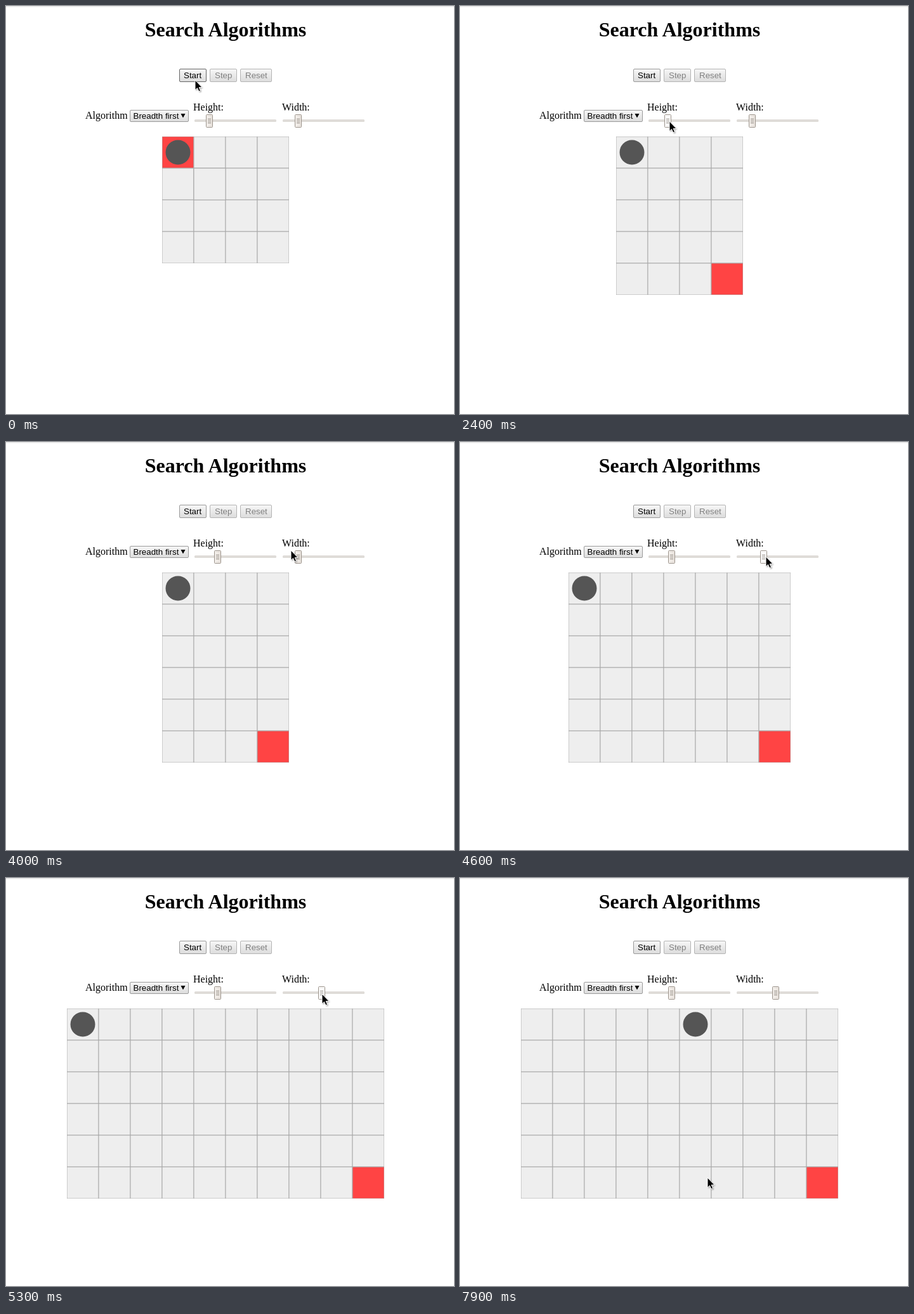
Animation, 706 px wide and 644 px high, one loop 8000 ms. Source, as an HTML page:

```html
<!DOCTYPE html>
<html lang="en">
<head>
<meta charset="utf-8">
<title>Search Algorithms</title>
<style>
  html, body { margin: 0; width: 100%; height: 100%; overflow: hidden; background: #fff; }
  #stage { display: block; position: absolute; left: 0; top: 0; }
  text { font: 16px "Liberation Serif", "Times New Roman", serif; fill: #000; }
  .title { font-weight: bold; font-size: 32px; text-anchor: middle; }
  .ui { font: 13.333px "Liberation Sans", Arial, sans-serif; }
  .off { fill: #808080; }
  .cell { fill: #eee; stroke: #aaa; }
  .goal { fill: #f44; }
</style>
</head>
<body>
<svg id="stage" width="706" height="644" viewBox="0 0 706 644">
  <defs>
    <linearGradient id="face" x2="0" y2="1">
      <stop stop-color="#f7f7f7"/><stop offset="1" stop-color="#dcdcdc"/>
    </linearGradient>
    <linearGradient id="knob">
      <stop stop-color="#f4f0ec"/><stop offset="1" stop-color="#e6e0da"/>
    </linearGradient>
    <filter id="soft" x="-50%" y="-50%" width="200%" height="200%">
      <feGaussianBlur stdDeviation="0.9"/>
    </filter>
  </defs>
  <rect width="706" height="644" fill="#fff"/>
  <rect width="706" height="1.5" fill="#e6e6e6"/>
  <text class="title" x="346" y="48">Search Algorithms</text>
  <g id="controls"></g>
  <text x="125" y="178">Algorithm</text>
  <text x="295" y="165">Height:</text>
  <text x="435" y="165">Width:</text>
  <g id="sliders"></g>
  <svg id="grid" y="206"></svg>
  <circle id="ball" r="19.5" fill="#555"/>
  <g id="cursor">
    <path d="M1.5 2V17l3.5-3 2.4 5.4 2.6-1.1-2.3-5.3h4.8Z" fill="#000" opacity=".4" filter="url(#soft)"/>
    <path d="M0 0V15.6l3.5-3.2 2.4 5.4 2.6-1.1-2.3-5.2H11Z" fill="#000" stroke="#fff" stroke-width="1"/>
  </g>
</svg>
<script>
const LOOP = 8000, STEP = 100, CELL = 50, TOP = 206, MID = 346, NOTCH = 6.21;
const $ = id => document.getElementById(id);

function add(parent, tag, attrs, text) {
  const el = document.createElementNS("http://www.w3.org/2000/svg", tag);
  for (const key in attrs) el.setAttribute(key, attrs[key]);
  if (text) el.textContent = text;
  parent.appendChild(el);
  return el;
}

function button(x, y, w, h, label, textX, on) {
  const box = add($("controls"), "rect", {
    x: x + .5, y: y + .5, width: w - 1, height: h - 1, rx: 1.5,
    fill: "url(#face)", stroke: on ? "#9a9a9a" : "#b4b4b4"
  });
  add($("controls"), "text", { class: on ? "ui" : "ui off", x: textX, y: y + 15 }, label);
  return box;
}

const startBox = button(273, 99, 43, 21, "Start", 280, true);
button(321, 99, 43, 21, "Step", 329, false);
button(369, 99, 50, 21, "Reset", 377, false);
button(195, 164, 93, 19, "Breadth first", 200.5, true).nextSibling.setAttribute("y", 178);
add($("controls"), "path", { d: "M275.5 170h7l-3.5 6.5Z" });

function slider(trackX, origin) {
  add($("sliders"), "rect", { x: trackX, y: 179, width: 129, height: 4, rx: 1.5, fill: "#dfdcd8" });
  const thumb = add($("sliders"), "g", {});
  const face = add(thumb, "rect", { x: .5, y: 171.5, width: 10, height: 20, rx: 1, stroke: "#9c948c" });
  add(thumb, "path", { d: "M3 178.5h5M3 181.5h5M3 184.5h5", stroke: "#8f8982" });
  return (value, p) => {
    const x = Math.round(origin + (value - 1) * NOTCH);
    const hover = p.x >= x && p.x <= x + 11 && p.y >= 171 && p.y <= 192;
    thumb.setAttribute("transform", `translate(${x})`);
    face.setAttribute("fill", hover ? "#faf9f8" : "url(#knob)");
  };
}

const setHeight = slider(297, 296.84);
const setWidth = slider(436, 436);

// Pointer path: time, x, y
const PATH = [
  [0, 298, 117], [800, 298, 117], [900, 299, 122], [1100, 306, 143], [1400, 322, 176], [1700, 321, 182],
  [1900, 313, 184], [2100, 320, 184], [2200, 320, 184],
  [2300, 325, 183], [2800, 352, 178], [2900, 356, 178], [3100, 346, 180], [3300, 333, 181], [3400, 333, 181],
  [3700, 383, 167], [4000, 449, 171], [4100, 470, 177], [4300, 461, 183],
  [4400, 465, 183], [4900, 507, 178], [5000, 511, 179], [5100, 509, 180], [5200, 504, 182],
  [5300, 498, 183], [5400, 497, 183], [5500, 497, 183],
  [5700, 470, 195], [6100, 290, 258], [6400, 193, 265],
  [6500, 170, 254], [6700, 132, 240], [6800, 128, 238], [6900, 140, 236],
  [7300, 363, 235], [7400, 373, 236], [7500, 378, 243], [7700, 387, 380], [7900, 390, 473], [8000, 390, 473]
];

function pointer(t) {
  const i = Math.max(1, PATH.findIndex(k => k[0] >= t));
  const [t0, x0, y0] = PATH[i - 1], [t1, x1, y1] = PATH[i];
  const k = (t - t0) / (t1 - t0);
  return { x: Math.round(x0 + (x1 - x0) * k), y: Math.round(y0 + (y1 - y0) * k) };
}

// Slider value while the pointer drags it between two times
function dragged(t, from, to, zero) {
  const x = pointer(Math.min(to, Math.max(from, t))).x;
  return Math.round((x - zero) / NOTCH) + 1;
}

function ballAt(t, p, left) {
  if (t >= 6800 && t <= 7400) return { x: p.x - 7, y: p.y - 7 };
  return { x: left + CELL * (t > 7400 ? 5.5 : .5), y: TOP + CELL / 2 };
}

let shape = "";
function buildGrid(rows, cols, fresh) {
  const key = [rows, cols, fresh].join();
  if (key === shape) return;
  shape = key;
  const grid = $("grid");
  grid.replaceChildren();
  grid.setAttribute("x", MID - cols * CELL / 2);
  grid.setAttribute("width", cols * CELL);
  grid.setAttribute("height", rows * CELL);
  const cell = (r, c, goal) => add(grid, "rect", {
    class: goal ? "cell goal" : "cell", x: c * CELL, y: r * CELL, width: CELL, height: CELL
  });
  const goalR = fresh ? 0 : rows - 1, goalC = fresh ? 0 : cols - 1;
  for (let r = 0; r < rows; r++)
    for (let c = 0; c < cols; c++) cell(r, c, r === goalR && c === goalC);
  if (fresh) cell(1, 1, false);
}

function draw(now) {
  const t = Math.floor(now % LOOP / STEP) * STEP;
  const p = pointer(t);
  const rows = dragged(t, 2200, 3300, 302.3);
  const cols = dragged(t, 4300, 5400, 443.5);
  buildGrid(rows, cols, t < 2300);
  setHeight(rows, p);
  setWidth(cols, p);
  startBox.setAttribute("stroke", p.y < 120 ? "#666" : "#9a9a9a");
  const b = ballAt(t, p, MID - cols * CELL / 2);
  $("ball").setAttribute("cx", b.x);
  $("ball").setAttribute("cy", b.y);
  $("cursor").setAttribute("transform", `translate(${p.x} ${p.y})`);
}

const begin = performance.now();
function tick() {
  draw(performance.now() - begin);
  requestAnimationFrame(tick);
}
tick();
</script>
</body>
</html>
```
